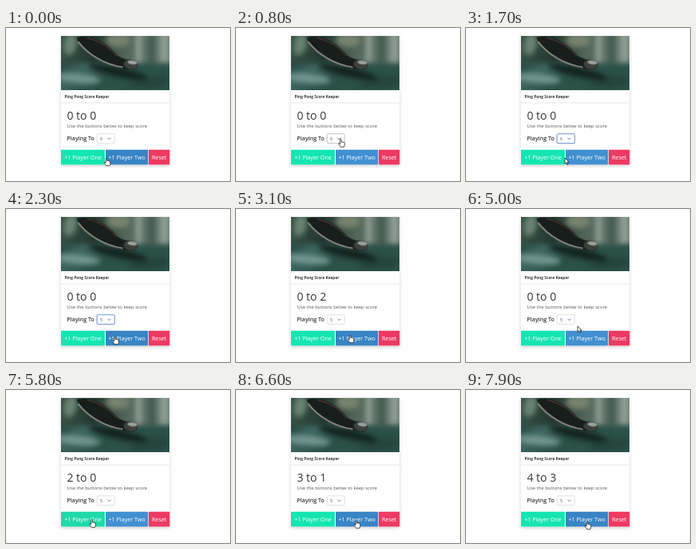
An HTML page with a canvas for the animation above (8000 ms loop, 281 by 192 pixels).

```html
<!DOCTYPE html>
<html lang="en">
<head>
<meta charset="utf-8">
<title>Ping Pong Score Keeper</title>
<style>
html, body { margin: 0; width: 100%; height: 100%; overflow: hidden; background: #fefefe; }
canvas { display: block; width: 281px; height: 192px; }
</style>
</head>
<body>
<canvas id="stage"></canvas>
<script>
const W = 281, H = 192, LOOP = 8000, STEP = 100;
const canvas = document.getElementById('stage');
const dpr = window.devicePixelRatio || 1;
canvas.width = Math.round(W * dpr);
canvas.height = Math.round(H * dpr);
const ctx = canvas.getContext('2d');
const FONT = '"Open Sans", "Noto Sans", sans-serif';

// Pointer path: time, x, y of the hot spot
const path = [
  [0, 126, 163], [300, 127, 162], [800, 131.5, 139.5], [1200, 131.5, 139.5],
  [1700, 124, 163], [1900, 124, 163], [2500, 141, 159], [3100, 143, 158],
  [3900, 143, 158], [4500, 196, 162], [4700, 196, 162], [5000, 140, 147],
  [5300, 107, 162], [6200, 108, 163], [6500, 151, 163.5], [6800, 151, 163.5],
  [7100, 108, 163], [7300, 108, 163], [7600, 152, 165], [8000, 152, 165]
];
const RESET = 4700, WIN = 3800;
const oneClicks = [5400, 5700, 6000, 7300];
const twoClicks = [2800, 3000, 3300, 3500, WIN, 6400 + STEP, 6800, 7700];
const openAt = 1200, pickAt = 1900, blurAt = 2800;

const buttons = [
  { x: 69, w: 55, label: '+1 Player One', color: '#15e5b1', hover: '#20d9a8', player: true },
  { x: 125, w: 53.3, label: '+1 Player Two', color: '#4190d1', hover: '#3884c4', player: true },
  { x: 179, w: 26.3, label: 'Reset', color: '#ed3a63', hover: '#e2305b' }
];
const BTN_Y = 152.7, BTN_H = 18.8;

function text(s, x, y, size, color, weight = 400, c = ctx) {
  c.font = `${weight} ${size}px ${FONT}`;
  c.fillStyle = color;
  c.fillText(s, x, y);
  return x + c.measureText(s).width;
}

function shape(c, points, color) {
  c.beginPath();
  points.forEach(([x, y]) => c.lineTo(x, y));
  c.closePath();
  c.fillStyle = color;
  c.fill();
}

function ellipse(c, x, y, rx, ry, angle, color) {
  c.beginPath();
  c.ellipse(x, y, rx, ry, angle, 0, Math.PI * 2);
  c.fillStyle = color;
  c.fill();
}

// Soft picture of a bat lying on a table, 137 x 68
function makePhoto() {
  const p = document.createElement('canvas');
  p.width = 137 * dpr;
  p.height = 68 * dpr;
  const c = p.getContext('2d');
  c.scale(dpr, dpr);
  const wall = c.createLinearGradient(0, 0, 137, 0);
  wall.addColorStop(0, '#385348');
  wall.addColorStop(0.3, '#233730');
  wall.addColorStop(0.6, '#53665a');
  wall.addColorStop(1, '#72847a');
  c.fillStyle = wall;
  c.fillRect(0, 0, 137, 68);
  c.filter = `blur(${3 * dpr}px)`;
  ellipse(c, 12, 10, 8, 14, 0.2, '#6b8373');
  ellipse(c, 72, 5, 15, 9, 0, '#77836f');
  [94, 110, 126].forEach((x, i) => {
    c.fillStyle = ['#8b9b90', '#42584e', '#91a198'][i];
    c.fillRect(x, -6, 8, 42);
  });
  const table = c.createLinearGradient(0, 30, 30, 72);
  table.addColorStop(0, '#253e3a');
  table.addColorStop(0.45, '#3f6962');
  table.addColorStop(1, '#2b5149');
  c.fillStyle = table;
  c.fillRect(-10, 34, 160, 44);
  ellipse(c, 22, 53, 28, 6, 0.1, '#72958e');
  ellipse(c, 112, 58, 26, 7, -0.1, '#25453d');
  ellipse(c, 72, 45, 38, 6, 0.22, '#14231f');
  c.filter = `blur(${0.6 * dpr}px)`;
  c.beginPath();
  c.moveTo(20, 2);
  c.bezierCurveTo(37, -3, 57, 7, 71, 24);
  c.bezierCurveTo(78, 30, 88, 29, 94, 32);
  c.bezierCurveTo(100, 36, 96, 43, 88, 42);
  c.bezierCurveTo(73, 40, 61, 37, 49, 29);
  c.bezierCurveTo(35, 22, 24, 13, 20, 2);
  c.fillStyle = '#171e1c';
  c.fill();
  c.strokeStyle = '#a6a099';
  c.lineWidth = 1.5;
  c.beginPath();
  c.moveTo(22, 7);
  c.bezierCurveTo(34, 23, 56, 36, 78, 39);
  c.stroke();
  c.strokeStyle = '#7b4e46';
  c.lineWidth = 0.8;
  c.beginPath();
  c.moveTo(33, 2);
  c.quadraticCurveTo(57, 8, 70, 25);
  c.stroke();
  ellipse(c, 88, 35.5, 9, 6, 0.12, '#3c413d');
  ellipse(c, 90, 33, 6, 2.5, 0.1, '#9ba19a');
  return p;
}
const photo = makePhoto();

function pointerAt(t) {
  let i = 0;
  while (i < path.length - 2 && t >= path[i + 1][0]) i++;
  const a = path[i], b = path[i + 1];
  const k = (t - a[0]) / (b[0] - a[0]);
  const e = k * k * (3 - 2 * k);
  return [a[1] + (b[1] - a[1]) * e, a[2] + (b[2] - a[2]) * e];
}

const inside = (x, y, bx, by, w, h) => x >= bx && x <= bx + w && y >= by && y <= by + h;

function stateAt(t) {
  const [x, y] = pointerAt(t);
  const count = list => list.filter(c => c <= t && (t < RESET || c >= RESET)).length;
  const won = t >= WIN && t < RESET;
  const open = t >= openAt && t < pickAt;
  const over = open ? -1 : buttons.findIndex(b =>
    inside(x, y, b.x, BTN_Y, b.w, BTN_H) && !(won && b.player));
  const select = !open && inside(x, y, 114, 132.5, 22.5, 12.5);
  return {
    x, y, won, over, select,
    one: count(oneClicks), two: count(twoClicks),
    limit: t < pickAt ? 6 : 5,
    focus: t >= openAt && t < blurAt
  };
}

function drawCard() {
  ctx.save();
  ctx.shadowColor = 'rgba(10,10,10,.2)';
  ctx.shadowBlur = 4 * dpr;
  ctx.shadowOffsetY = dpr;
  ctx.fillStyle = '#fff';
  ctx.fillRect(68.7, 10.3, 136.6, 161.3);
  ctx.restore();
  ctx.drawImage(photo, 68.6, 10.2, 136.8, 68);
  ctx.fillStyle = '#e3e3e3';
  ctx.fillRect(68.7, 93.6, 136.6, 0.8);
  text('Ping Pong Score Keeper', 73.6, 88, 4.8, '#363636', 700);
}

function drawScore(s) {
  const dark = '#363636';
  let x = text(s.one, 76.4, 115.2, 14.1, s.won ? '#f14668' : dark, 500);
  x = text(' to ', x, 115.2, 14.1, dark, 500);
  text(s.two, x, 115.2, 14.1, s.won ? '#48c78e' : dark, 500);
  text('Use the buttons below to keep score', 76.6, 125, 5.93, '#555');
  text('Playing To', 76.5, 140.8, 7.1, dark, 600);
}

function drawSelect(s) {
  ctx.beginPath();
  ctx.roundRect(114.2, 132.8, 22, 11.8, 1.4);
  if (s.focus) {
    ctx.lineWidth = 1.8;
    ctx.strokeStyle = 'rgba(72,115,200,.25)';
    ctx.stroke();
  }
  ctx.lineWidth = 0.7;
  ctx.strokeStyle = s.focus ? '#4878c5' : s.select ? '#aaa' : '#d4d4d4';
  ctx.fillStyle = '#fff';
  ctx.fill();
  ctx.stroke();
  text(s.limit, 118, 140.8, 5.4, '#555');
  ctx.beginPath();
  ctx.moveTo(127.6, 137.8);
  ctx.lineTo(129.6, 139.8);
  ctx.lineTo(131.6, 137.8);
  ctx.lineWidth = 0.9;
  ctx.strokeStyle = s.select ? '#363636' : '#536a9f';
  ctx.stroke();
}

function drawButtons(s) {
  buttons.forEach((b, i) => {
    ctx.globalAlpha = s.won && b.player ? 0.5 : 1;
    ctx.beginPath();
    ctx.roundRect(b.x, BTN_Y, b.w, BTN_H, 0.8);
    ctx.fillStyle = i === s.over ? b.hover : b.color;
    ctx.fill();
    ctx.textAlign = 'center';
    text(b.label, b.x + b.w / 2, 164.8, 7.2, '#fff');
    ctx.textAlign = 'left';
    ctx.globalAlpha = 1;
  });
}

const arrow = new Path2D('M0 0V7.4L1.7 5.9L2.9 8.5L4.1 8L2.9 5.4H5.2Z');
const hand = new Path2D('M-.8 .7Q0 -.5 .8 .7V3.6Q1.6 2.9 2.2 3.8Q3 3.2 3.5 4.2' +
  'Q4.5 3.7 4.8 4.9V7.1Q4.8 8.6 3.9 9.8H-.3Q-1.4 8.1 -2.8 6.2Q-3 5 -2 5.1L-.8 6.1Z');

function drawPointer(s) {
  ctx.save();
  ctx.translate(s.x, s.y);
  ctx.lineJoin = 'round';
  ctx.lineWidth = 0.8;
  ctx.strokeStyle = '#222';
  ctx.fillStyle = '#fff';
  const icon = s.over >= 0 || s.select ? hand : arrow;
  ctx.fill(icon);
  ctx.stroke(icon);
  ctx.restore();
}

function draw(t) {
  const s = stateAt(t);
  ctx.setTransform(dpr, 0, 0, dpr, 0, 0);
  ctx.fillStyle = '#fefefe';
  ctx.fillRect(0, 0, W, H);
  drawCard();
  drawScore(s);
  drawSelect(s);
  drawButtons(s);
  drawPointer(s);
}

const start = performance.now();
function tick() {
  const t = (performance.now() - start) % LOOP;
  draw(Math.floor(t / STEP) * STEP);
  requestAnimationFrame(tick);
}
tick();
</script>
</body>
</html>
```
